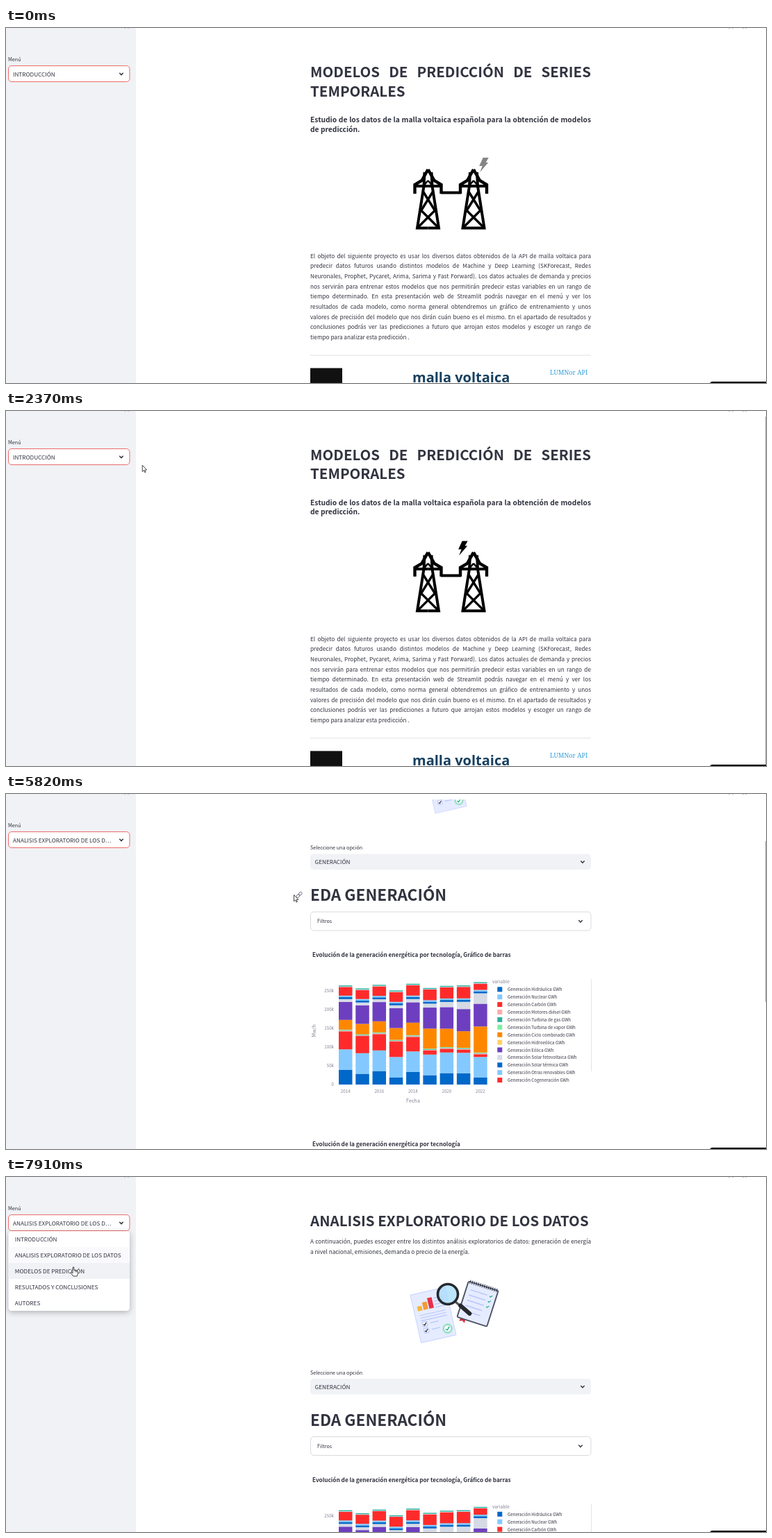
These frames come from a looping animation (1094x512 px, 7990 ms). An HTML page with a canvas:

```html
<!DOCTYPE html>
<html lang="es">
<head>
<meta charset="utf-8">
<title>Modelos de predicción</title>
<style>
html, body { margin: 0; width: 100%; height: 100%; overflow: hidden; background: #fff; }
canvas { display: block; }
</style>
</head>
<body>
<canvas id="stage" width="1094" height="512"></canvas>
<script>
const c = document.getElementById('stage').getContext('2d');
const LOOP = 7990, LEFT = 438, RIGHT = 842;
const INK = '#31333f', PALE = '#f0f2f6', GREY = '#808495';
const FAMILY = '"Noto Sans CJK JP", "Noto Sans CJK SC", "Noto Sans CJK", "Noto Sans", sans-serif';

const MENU = ['INTRODUCCIÓN', 'ANALISIS EXPLORATORIO DE LOS DATOS', 'MODELOS DE PREDICCIÓN',
  'RESULTADOS Y CONCLUSIONES', 'AUTORES'];
const BODY = [
  'El objeto del siguiente proyecto es usar los diversos datos obtenidos de la API de malla voltaica para',
  'predecir datos futuros usando distintos modelos de Machine y Deep Learning (SKForecast, Redes',
  'Neuronales, Prophet, Pycaret, Arima, Sarima y Fast Forward). Los datos actuales de demanda y precios',
  'nos servirán para entrenar estos modelos que nos permitirán predecir estas variables en un rango de',
  'tiempo determinado. En esta presentación web de Streamlit podrás navegar en el menú y ver los',
  'resultados de cada modelo, como norma general obtendremos un gráfico de entrenamiento y unos',
  'valores de precisión del modelo que nos dirán cuán bueno es el mismo. En el apartado de resultados y',
  'conclusiones podrás ver las predicciones a futuro que arrojan estos modelos y escoger un rango de',
  'tiempo para analizar esta predicción .'];
const SERIES = ['Hidráulica', 'Nuclear', 'Carbón', 'Motores diésel', 'Turbina de gas', 'Turbina de vapor',
  'Ciclo combinado', 'Hidroeólica', 'Eólica', 'Solar fotovoltaica', 'Solar térmica',
  'Otras renovables', 'Cogeneración'];
const PALETTE = ['#0068c9', '#83c9ff', '#ff2b2b', '#ffabab', '#29b09d', '#7defa1', '#ff8700',
  '#ffd16a', '#6d3fc0', '#d5dae5'];
const HYDRO = [21, 15.5, 19.5, 10, 18, 13.5, 16.5, 16, 10];

// Moves: start time, end time, destination
const SCROLL = [[480, 950, 103.5], [1950, 2380, 0], [5460, 5810, 204.5], [6080, 6440, 0]];
const MOUSE = [[60, 850, 240, 170], [850, 1640, 374, 149], [1900, 2520, 166, 66],
  [2800, 3600, 141.5, 107], [4240, 4640, 414.5, 145.5], [6500, 7050, 146, 66], [7200, 7800, 97, 130]];

const mix = (a, b, u) => a + (b - a) * u;
const clamp = u => Math.max(0, Math.min(1, u));
const ease = u => u * u * (3 - 2 * u);
const between = (t, a, b) => t >= a && t < b;
const travel = (moves, t, from) => moves.reduce((pos, [a, b, ...to]) => {
  const u = ease(clamp((t - a) / (b - a)));
  return pos.map((v, i) => mix(v, to[i], u));
}, from);
function curve(x, ...pts) {
  const i = Math.max(1, pts.findIndex(p => p[0] >= x)), [x0, y0] = pts[i - 1], [x1, y1] = pts[i];
  return mix(y0, y1, (x - x0) / (x1 - x0));
}

// Latin glyphs of this family are drawn 1.116 times larger than its nominal size
function font(size, weight = 400) { c.font = `${weight} ${size / 1.116}px ${FAMILY}`; }
function text(s, x, y, size, { weight, color = INK, align = 'left' } = {}) {
  font(size, weight);
  c.fillStyle = color;
  c.textAlign = align;
  c.fillText(s, x, y);
}
function justify(s, y, size, weight) {
  font(size, weight);
  const words = s.split(' '), sizes = words.map(w => c.measureText(w).width);
  const gap = (RIGHT - LEFT - sizes.reduce((a, b) => a + b)) / (words.length - 1);
  let x = LEFT;
  words.forEach((w, i) => { text(w, x, y, size, { weight }); x += sizes[i] + gap; });
}
function rect(x, y, w, h, fill) { c.fillStyle = fill; c.fillRect(x, y, w, h); }
function paint(fill, stroke, width = 1) {
  if (fill) { c.fillStyle = fill; c.fill(); }
  if (stroke) { c.strokeStyle = stroke; c.lineWidth = width; c.stroke(); }
}
function box(x, y, w, h, r, fill, stroke, width) {
  c.beginPath();
  c.roundRect(x, y, w, h, r);
  paint(fill, stroke, width);
}
function disc(x, y, r, fill, stroke, width) {
  c.beginPath();
  c.arc(x, y, r, 0, 7);
  paint(fill, stroke, width);
}
function trace(pts) {
  c.beginPath();
  for (let i = 0; i < pts.length; i += 2) c.lineTo(pts[i], pts[i + 1]);
}
function line(pts, color, width) { trace(pts); paint(null, color, width); }
function shape(pts, fill, stroke, width) { trace(pts); c.closePath(); paint(fill, stroke, width); }
const chevron = (x, y) => line([x - 2.7, y - 1.4, x, y + 1.4, x + 2.7, y - 1.4], INK, 1.5);
const tick = (x, y, s, color) => line([x - s, y, x - s * .3, y + s * .7, x + s, y - s * .8], color, 1.2);
function placed(x, y, angle, scale, draw) {
  c.save();
  c.translate(x, y);
  c.rotate(angle);
  c.scale(scale, scale);
  draw();
  c.restore();
}

function tower(x) {
  placed(x, 0, 0, 1, () => {
    for (const side of [-1, 1]) {
      c.save();
      c.scale(side, 1);
      line([0, 204, 9, 220, 19, 226, 19, 239], '#000', 4.4);
      line([5, 208, 6, 228, 15.5, 288.5, 0, 288.5], '#000', 4);
      line([0, 228, 20, 228], '#000', 4);
      line([6, 227, 0, 220], '#000', 2.5);
      line([7, 236, -11, 265], '#000', 3.4);
      line([11, 262, -15, 288], '#000', 3.4);
      c.restore();
    }
  });
}
function pylons(t) {
  tower(607.5);
  tower(673);
  line([626, 237.5, 655, 237.5], '#000', 4);
  const u = clamp((t + 2760) % 3090 / 2860);
  const x = 594 + 98 * u ** 1.28, y = 199 + 8.5 * Math.cos((x - 640) / 33 * Math.PI);
  c.globalAlpha = clamp(Math.min((x - 594) / 7, (692 - x) / 9));
  placed(x, y, 0, 1, () =>
    shape([-1, -10.5, 7, -10.5, 3, -3.5, 6.5, -3.5, -5.5, 10.5, -2, 1.5, -6.5, 1.5], '#000'));
  c.globalAlpha = 1;
}

function project(t, dy) {
  placed(0, dy, 0, 1, () => {
    pylons(t);
    BODY.forEach((s, i) => {
      const y = 331.8 + i * 14.67;
      if (i < BODY.length - 1) justify(s, y, 9.17);
      else text(s, LEFT, y, 9.17);
    });
    rect(LEFT, 471.5, RIGHT - LEFT, 1, '#dfe0e4');
    rect(LEFT, 490.5, 46, 40, '#111');
    c.textAlign = 'left';
    c.fillStyle = '#17405f';
    c.font = '600 20px "Noto Sans", sans-serif';
    c.fillText('malla voltaica', 585, 511);
    c.fillStyle = '#2e9bd8';
    c.font = '500 9px "Noto Serif", serif';
    c.fillText('LUMNor API', 783, 499.8);
  });
}
function intro(t) {
  justify('MODELOS DE PREDICCIÓN DE SERIES', 71, 22.9, 700);
  text('TEMPORALES', LEFT, 98.6, 22.9, { weight: 700 });
  justify('Estudio de los datos de la malla voltaica española para la obtención de modelos', 135.8, 11.46, 700);
  text('de predicción.', LEFT, 149.6, 11.46, { weight: 700 });
  project(t, 0);
}
function analysisHead() {
  text('ANALISIS EXPLORATORIO DE LOS DATOS', LEFT, 71, 22.9, { weight: 700 });
  justify('A continuación, puedes escoger entre los distintos análisis exploratorios de datos: generación de energía', 95.8, 9.17);
  text('a nivel nacional, emisiones, demanda o precio de la energía.', LEFT, 110.6, 9.17);
}

// Sheet, notepad and magnifier; u spreads them apart
function reports(u) {
  const soft = '#b9c6fb', teal = '#1aa68c', dark = '#26282d';
  const onSheet = draw => placed(mix(633.5, 615, u), mix(196.5, 199, u), -.225, mix(1, 1.12, u), draw);
  onSheet(() => {
    box(-23, -31.5, 46, 63, 1, '#e6ecff', '#ccd7ff');
    ['#f6b73c', '#f19a38', '#e8314a'].forEach((color, i) =>
      rect(-18 + i * 7.5, -9, 6, -6 - i * 4, color));
    for (let i = 0; i < 4; i++) line([5, -21 + i * 4, 18, -21 + i * 4], soft, 1.1);
    for (let i = 0; i < 3; i++) line([-17, -3 + i * 3.5, 17, -3 + i * 3.5], soft, 1);
    for (const y of [9, 17.5]) {
      box(-16, y - 3, 6, 6, 1, '#fff', soft);
      tick(-13, y, 2, INK);
      line([-6, y, 5, y], soft, 1.2);
    }
  });
  placed(mix(658, 679, u), mix(177.5, 183, u), .31 * u, mix(1, .9, u), () => {
    shape([-19, 29, -11, 29, -11, 36, -15, 33, -20, 35], '#d62b3c');
    box(-25, -30, 50, 60, 2, '#e6ecff', '#4b5164', 2);
    for (let x = -22; x < 24; x += 3.4) line([x, -33, x, -27], '#33384a', 1.2);
    for (let i = 0; i < 5; i++) {
      const y = -18 + i * 8.7;
      line([-18, y, 10, y], soft, 1.7);
      if (i < 3) tick(16.5, y, 2.2, teal);
    }
  });
  onSheet(() => {
    disc(14.1, 21.2, 7, '#b6e8d8');
    disc(14.1, 21.2, 4.9, '#fff', '#5fc6a8', .8);
    tick(14.1, 21.2, 2.7, teal);
  });
  placed(mix(674.5, 636, u), mix(159, 169, u), 0, mix(1, 1.65, u), () => {
    line([6, 6, 10, 9.5], '#50545c', 2);
    c.lineCap = 'round';
    line([11, 10, 19, 17], dark, 3.6);
    c.lineCap = 'butt';
    disc(0, 0, 8.8, 'rgba(166,220,250,.75)', dark, 2.2);
    if (u < .5) tick(0, 0, 2.5, teal);
  });
}

// Heights in series order for year i
function stack(i) {
  const coal = curve(i, [0, 26], [4, 21], [5, 6], [8, 4]);
  const gas = curve(i, [0, 14], [4, 18], [5, 29], [7, 24], [8, 37.5]);
  const cogen = curve(i, [0, 12.5], [7, 16.5], [8, 9]);
  return [HYDRO[i], 29.7, coal, 1, .8, .7, gas, 0, 26 + i * .85, 4 + 11 * (i / 8) ** 4, 2.8, 2.2, cogen];
}
function chart() {
  const base = 623.5, centred = { color: GREY, align: 'center' };
  for (let i = 0; i < 6; i++) {
    const y = base - i * 27;
    rect(476.5, y - .5, 218, 1, '#eef0f5');
    text(i ? i * 50 + 'k' : '0', 472, y + 2.4, 6.9, { color: GREY, align: 'right' });
  }
  for (let i = 0; i < HYDRO.length; i++) {
    const x = 479 + i * 24.27;
    let y = base;
    stack(i).forEach((h, j) => { y -= h; rect(x, y, 19.5, h, PALETTE[j % 10]); });
    rect(x, y - .8, 19.5, .8, PALETTE[9]);
    rect(x, y - 2.2, 19.5, 1.4, PALETTE[4]);
    if (i % 2 === 0) text(2014 + i, x + 9.7, 635.7, 6.9, centred);
  }
  text('Fecha', 586, 649.3, 8, centred);
  placed(446, 546, -Math.PI / 2, 1, () => text('Mw/h', 0, 0, 8, centred));
  text('variable', 700, 477.5, 7.4, { color: GREY });
  SERIES.forEach((s, i) => {
    const y = 486.4 + i * 10.9;
    rect(707.3, y - 3.6, 7, 7, PALETTE[i % 10]);
    text(`Generación ${s} GWh`, 722, y + 2.4, 6.9);
  });
  rect(842, 471.5, 1, 133, '#e4e5e9');
}
function explore(t, scroll) {
  analysisHead();
  reports(ease(clamp((t - 6520) / 630)));
  text('Seleccione una opción', LEFT, 284.7, 8.02);
  box(LEFT, 291, 404, 22.5, 4.5, PALE);
  text('GENERACIÓN', 444.5, 305.7, 9.17);
  chevron(830, 302.3);
  text('EDA GENERACIÓN', LEFT, 358.5, 25.2, { weight: 700 });
  if (scroll > 185) placed(422, 350, -.78, 1, () => {
    for (const x of [-5, -.5]) box(x, -1.8, 5.5, 3.6, 1.8, null, GREY);
  });
  box(438.5, 374.5, 403.5, 27, 4.5, '#fff', '#d9dade');
  text('Filtros', 448, 390.6, 8.02);
  chevron(827, 388);
  const title = 'Evolución de la generación energética por tecnología';
  text(title + ', Gráfico de barras', 441, 439.7, 9.17, { weight: 700 });
  chart();
  text(title, 441, 712, 9.17, { weight: 700 });
}

function sidebar(t, open, picked, hover) {
  rect(0, 0, 187, 512, PALE);
  text('Menú', 3, 48.2, 8.02);
  box(3.5, 54.5, 174.5, 23, 4.5, '#fff', '#ee6a69');
  text(picked ? 'ANALISIS EXPLORATORIO DE LOS D…' : MENU[0], 10, 69.6, 9.17);
  chevron(166, 66.2);
  if (between(t, 4300, 5540) || between(t, 6060, 6590)) rect(153, 60, 1, 12.5, INK);
  if (!open) return;
  c.save();
  c.shadowColor = 'rgba(0,0,0,.28)';
  c.shadowBlur = 9;
  c.shadowOffsetY = 2;
  box(3.5, 78, 174.5, 115, 4.5, '#fff');
  c.restore();
  MENU.forEach((s, i) => {
    const y = 78 + i * 23;
    if (i === hover) rect(3.5, y, 174.5, 23, PALE);
    else if (i === picked) rect(3.5, y, 174.5, 23, '#fafafc');
    text(s, 12.8, y + 14.8, 9.17);
  });
}

function pointer(x, y, hand) {
  const arrow = [0, 0, 0, 9.3, 2.1, 7.4, 3.6, 10.6, 4.9, 10, 3.5, 7, 6.3, 6.8];
  const palm = [-.8, 0, .8, 0, 1, 4.5, 6.2, 5.5, 6.5, 9, 5.2, 13, -.3, 13, -3.8, 8, -2.8, 7, -.8, 8.6];
  placed(x, y, 0, 1, () => {
    c.lineJoin = 'round';
    shape(hand ? palm : arrow, '#fff', '#333', .9);
    if (hand) for (const d of [2.7, 4.5]) line([d, 5, d, 7.5], '#333', .7);
  });
}

function edges(t, scroll) {
  const mark = '#c4c5ca';
  for (const x of [170, 175, 1040, 1045, 1060, 1064]) rect(x, 0, 2, 1, mark);
  if (between(t, 4300, 5100)) {
    for (const x of [911.5, 918]) disc(x, 0, 2.6, null, '#8f929b');
    rect(988, 0, 3, 1, mark);
  }
  let top = 8, len = 0;
  if (between(t, 480, 2550)) { top += scroll * .58; len = 512 - top; }
  else if (between(t, 4300, 5000)) len = 470;
  else if (between(t, 5000, 7050)) { top += scroll * .293; len = 206 + scroll * .127; }
  rect(1093, top, 1, len, '#a9abb2');
  box(1013, 510, 90, 8, 4, '#000');
}

function draw(t) {
  const [scroll] = travel(SCROLL, t, [0]), [mx, my] = travel(MOUSE, t, [560, 516]);
  const open = between(t, 2590, 4240) || t >= 7130;
  const picked = t >= 4240 ? 1 : 0;
  rect(0, 0, 1094, 512, '#fff');
  c.save();
  c.beginPath();
  c.rect(187, 8, 907, 504);
  c.clip();
  c.translate(0, -scroll);
  if (t < 4450) intro(t);
  else if (t < 5000) { analysisHead(); project(t, -46.8); }
  else explore(t, scroll);
  c.restore();
  sidebar(t, open, picked, Math.floor((my - 78) / 23));
  edges(t, scroll);
  const hand = mx < 178 && between(my, 54, open ? 193 : 78);
  pointer(mx, my, hand);
}

const start = performance.now();
function loop() {
  draw((performance.now() - start) % LOOP);
  requestAnimationFrame(loop);
}
loop();
</script>
</body>
</html>
```
